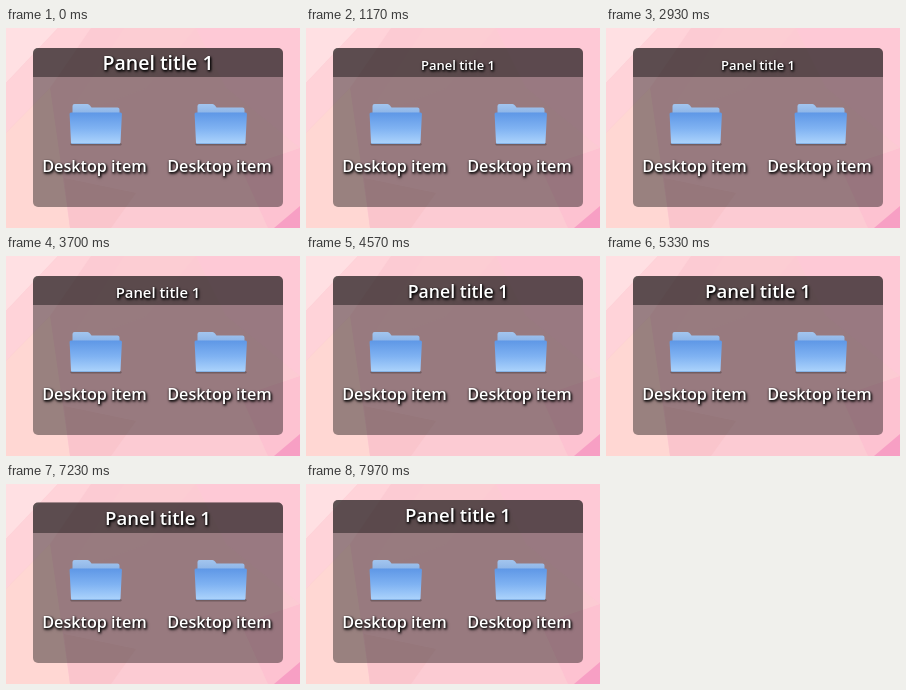
An HTML page for the animation above (8 s loop, 294 by 200 pixels).

```html
<!DOCTYPE html>
<html lang="en">
<head>
<meta charset="utf-8">
<title>Desktop panel</title>
<style>
  html, body { margin: 0; width: 100%; height: 100%; overflow: hidden; }
  svg { display: block; width: 294px; height: 200px; }

  .panel {
    x: 27px; y: 20px; width: 250px; height: 159px; rx: 5px;
    fill: rgba(0, 0, 0, .4);
    animation: grow 8s step-end infinite;
  }
  .header { clip-path: url(#top); }

  text {
    font-family: "Open Sans", "Noto Sans", sans-serif;
    font-weight: 600;
    fill: #fff; text-anchor: middle;
    filter: drop-shadow(1px 1px .8px #000) drop-shadow(.5px 1px 1px rgba(0, 0, 0, .6));
  }
  .label { font-size: 16.2px; }
  .title {
    --step: .93px;
    font-size: calc(13px + var(--n) * var(--step));
    animation: resize 8s step-end infinite, lift 8s step-end infinite;
  }

  @keyframes resize {
    0%      { --n: 7; }
    14.625% { --n: 0; }
    29.625% { --n: -1; }
    36.625% { --n: 0; }
    41.25%  { --n: 1; }
    46.25%  { --n: 2; }
    51.625% { --n: 3; }
    57.125% { --n: 5; }
    66.625%, 100% { --n: 6; }
  }
  @keyframes grow {
    0%      { y: 20px; height: 159px; }
    85%     { y: 19.4px; height: 159.6px; }
    90.375% { y: 18.6px; height: 160.4px; }
    95%     { y: 17px; height: 162px; }
    99.625%, 100% { y: 16px; height: 163px; }
  }
  @keyframes lift {
    0%      { transform: translateY(0); }
    90.375% { transform: translateY(-1px); }
    95%     { transform: translateY(-3px); }
    99.625%, 100% { transform: translateY(-4px); }
  }
</style>
</head>
<body>
<svg viewBox="0 0 294 200">
  <defs>
    <clipPath id="top"><rect width="294" height="49"/></clipPath>
    <linearGradient id="back" x1="0" y1="0" x2="0" y2="1">
      <stop offset="0" stop-color="#a3c5ee"/>
      <stop offset="1" stop-color="#86b0e6"/>
    </linearGradient>
    <linearGradient id="front" x1="0" y1="0" x2="0" y2="1">
      <stop offset="0" stop-color="#5e97e6"/>
      <stop offset=".5" stop-color="#7fb2f2"/>
      <stop offset="1" stop-color="#add4fc"/>
    </linearGradient>
    <g id="folder">
      <rect x="1" y="39" width="51" height="2.500" rx="1.200" fill="#000" opacity=".25"/>
      <path d="M3 12V2Q3 0 5 0H18Q19.500 0 20.500 1.500L22 3.500H48Q50 3.500 50 5.500V12Z" fill="url(#back)"/>
      <path d="M1.500 8.500H51Q52.500 8.500 52.400 10L51 38.500Q50.900 40 49.500 40H3Q1.600 40 1.500 38.500L.1 10Q0 8.500 1.500 8.500Z" fill="url(#front)"/>
      <path d="M2 39.500H50.500" stroke="#6f9fd8" opacity=".6"/>
    </g>
    <g id="item">
      <use href="#folder" x="63.500" y="76"/>
      <text class="label" x="88.500" y="144">Desktop item</text>
    </g>
  </defs>

  <rect width="294" height="200" fill="#fccbd3"/>
  <path d="M0 0H52L0 55Z" fill="#ffe0e3"/>
  <path d="M52 0H85L44 60L0 105V55Z" fill="#ffd3d9"/>
  <path d="M0 105L44 60L64 200H0Z" fill="#ffd7d3"/>
  <path d="M118 0H190L140 60L60 90Z" fill="#fccdd3"/>
  <path d="M190 0H294V120L220 60Z" fill="#fec9d6"/>
  <path d="M64 200L58 150L130 165L105 200Z" fill="#fac5cc"/>
  <path d="M294 120L235 140L262 200H294Z" fill="#fdc2d1"/>
  <path d="M268 200L294 178V200Z" fill="#f79fc4"/>

  <rect class="panel"/>
  <rect class="panel header"/>

  <use href="#item"/>
  <use href="#item" x="125"/>
  <text class="title" x="152" y="42">Panel title 1</text>
</svg>
</body>
</html>
```
